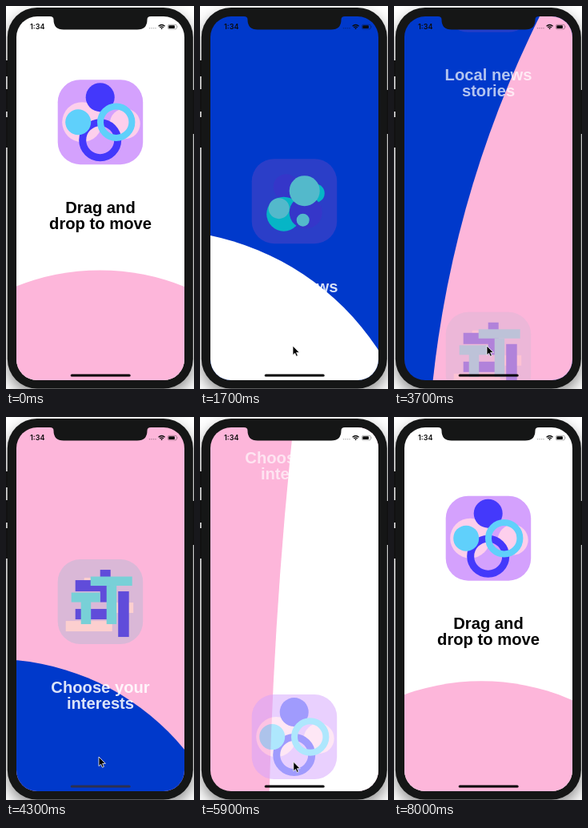
An HTML page that plays this animation: 235 px wide and 479 px high, repeating every 8100 ms.

```html
<!DOCTYPE html>
<html lang="en">
<head>
<meta charset="utf-8">
<title>Onboarding pages</title>
<style>
html, body { margin: 0; width: 100%; height: 100%; overflow: hidden; background: #fff; }
svg { display: block; width: 100vw; height: 100vh; }
.title { font: 700 20.2px "Liberation Sans", Arial, sans-serif; text-anchor: middle; }
.clock { font: 600 9px Inter, Roboto, sans-serif; }
</style>
</head>
<body>
<svg viewBox="0 0 235 479">
  <defs>
    <filter id="blur" x="-20%" y="-20%" width="140%" height="140%"><feGaussianBlur stdDeviation="9"/></filter>
    <clipPath id="screen"><rect x="13" y="13" width="210" height="455" rx="26"/></clipPath>
  </defs>
  <rect width="235" height="479" fill="#fff"/>
  <rect x="2" y="10" width="232" height="476" rx="37" opacity=".45" filter="url(#blur)"/>
  <path d="M0 68h3v20h-3zM0 104h3v28h-3zM0 139h3v38h-3zM232 105h3v55h-3z" fill="#111"/>
  <rect x="1.8" y="2" width="232" height="476.5" rx="37" fill="#151616"/>
  <g clip-path="url(#screen)">
    <rect id="base" x="12" y="12" width="212" height="457"/>
    <circle id="wave"/>
    <g id="pages"></g>
    <g fill="#0b0b0b">
      <text class="clock" x="30" y="29">1:34</text>
      <g opacity=".3">
        <circle cx="179.5" cy="27.8" r=".8"/><circle cx="182" cy="27.8" r=".8"/>
        <circle cx="184.5" cy="27.8" r=".8"/><circle cx="187" cy="27.8" r=".8"/>
      </g>
      <path d="M190.6 25.2q4-3.4 8 0M192.2 26.8q2.4-2 4.8 0" fill="none" stroke="#0b0b0b" stroke-width="1.3"/>
      <path d="M193.2 27.8q1.4-1 2.8 0l-1.4 1.5z"/>
      <rect x="202.4" y="23.3" width="11" height="5.6" rx="1.6" fill="none" stroke="#0b0b0b" stroke-opacity=".45" stroke-width=".7"/>
      <rect x="203.3" y="24.2" width="7.6" height="3.8" rx=".8"/>
      <path d="M214.2 25.1q1 1 0 2z" opacity=".5"/>
    </g>
    <rect id="home" x="80.7" y="460.5" width="75" height="3" rx="1.5"/>
  </g>
  <path d="M55 10v3q4.5 0 4.5 4q0 12.5 12.5 12.5h92q12.5 0 12.5-12.5q0-4 4.5-4v-3z" fill="#151616"/>
  <path id="cursor" d="M0 0v11.6l2.6-2.4 1.8 4 2-.9-1.8-3.9h3.7z" fill="#000" stroke="#fff" stroke-width=".8"/>
</svg>
<script>
const LOOP = 8100, STEP = 100;
const SCALE = 0.5615, RADIUS = 500, GROW = 30;
const MID = 118, WAVE_TOP = 331, PAGE_H = 456, ICON_TOP = 92.2;
const WHITE = '#fff', BLUE = '#0039cb', PINK = '#fdb6da';
const $ = id => document.getElementById(id);

const disc = (x, y, r, fill) => `<circle cx="${x}" cy="${y}" r="${r}" fill="${fill}"/>`;
const ring = (x, y, r, w, color) =>
  `<circle cx="${x}" cy="${y}" r="${r}" fill="none" stroke="${color}" stroke-width="${w}"/>`;
const bar = (x, y, w, h, fill) => `<rect x="${x}" y="${y}" width="${w}" height="${h}" fill="${fill}"/>`;

const violet = '#4338fb', sky = '#5fd0fb', blush = '#fdcfec';
const mint = '#64d2cb', teal = '#08cdc6', grape = '#4036c9';
const indigo = '#493cdb', aqua = '#64d5d7', peach = '#fcd3ce';

const pages = [
  { bg: WHITE, ink: '#000', tile: '#d4a1fd', lines: ['Drag and', 'drop to move'],
    art: disc(30.5, 53, 25, blush) + disc(84, 55, 19, blush) + disc(53, 22, 18, violet) +
         ring(53, 75.5, 22, 9, violet) + disc(25.5, 53, 16, sky) + ring(73, 53, 19.7, 8, sky) },
  { bg: BLUE, ink: '#fff', tile: '#3440c8', lines: ['Local news', 'stories'],
    art: disc(43, 35, 16, grape) + disc(79, 43, 12, teal) + disc(40, 69, 21.5, teal) +
         disc(67.5, 67, 20.5, grape) + disc(66, 40, 19, mint) + disc(34, 62, 13, mint) +
         disc(64, 76.5, 8, mint) },
  { bg: PINK, ink: '#fff', tile: '#d5b9d7', lines: ['Choose your', 'interests'],
    art: bar(33, 23, 20, 12, peach) + bar(73, 54, 21.5, 13, peach) + bar(10, 77, 58, 13, peach) +
         bar(53, 13, 13, 40.5, indigo) + bar(22, 26, 40, 14, indigo) + bar(22, 62, 50, 13, indigo) +
         bar(75.5, 40, 13.5, 57, indigo) + bar(41, 21.5, 52, 11.5, aqua) + bar(61, 33, 12.5, 48, aqua) +
         bar(17, 41.5, 36, 12, aqua) + bar(29, 53, 12.5, 28, aqua) }
];

$('pages').innerHTML = pages.map(p => `<g>
  <g transform="translate(-53.3)">
    <rect width="106.5" height="106" rx="28" fill="${p.tile}"/>${p.art}
  </g>
  ${p.lines.map((s, i) => `<text class="title" y="${166.5 + i * 20.2}" fill="${p.ink}">${s}</text>`).join('')}
</g>`).join('');
const nodes = [...$('pages').children];

// Each tap scrolls one page: [start in ms, decay per second]
const taps = [[885, 1.99], [3435, 2.05], [5516, 1.75]];

function glide(t, [start, rate]) {
  const s = Math.max(0, t - start) / 1000;
  return s ? 1 - Math.exp(-rate * s * s / (s + 0.05)) : 0;
}

const wrap = (n, m) => ((n % m) + m) % m;
const ramp = (t, a, b) => {
  const u = Math.min(1, Math.max(0, (t - a) / (b - a)));
  return u * u * (3 - 2 * u);
};

function place(el, attrs) {
  for (const key in attrs) el.setAttribute(key, attrs[key]);
}

function draw(t) {
  const scroll = taps.reduce((sum, tap) => sum + glide(t, tap), 0);
  const from = Math.ceil(scroll) - 1;
  const p = scroll - from;
  const prev = pages[wrap(from, 3)].bg, next = pages[wrap(from + 1, 3)].bg;

  // The next page grows from the left edge, then the previous one shrinks to the right.
  const growing = p < 0.5;
  const near = growing ? p : 1 - p;
  const r = SCALE * (RADIUS + 2 ** (near * GROW));
  const shift = r - (1 - near * 2) * RADIUS * SCALE;
  const [under, over] = growing ? [prev, next] : [next, prev];
  place($('base'), { fill: under });
  place($('wave'), {
    cx: growing ? MID + shift : MID - shift,
    cy: WAVE_TOP + RADIUS * SCALE, r, fill: over
  });

  nodes.forEach((node, i) => {
    const d = wrap(i - scroll + 1.5, 3) - 1.5;
    place(node, {
      transform: `translate(${MID} ${ICON_TOP + d * PAGE_H})`,
      opacity: Math.max(0, 1 - Math.abs(d) ** 1.2)
    });
  });

  place($('home'), { fill: over === BLUE ? '#2c3050' : '#000' });

  const away = 1 - ramp(t, 400, 800) + ramp(t, 5800, 6300);
  place($('cursor'), { transform: `translate(${116 + away * 8} ${425 + away * 60})` });
}

const origin = performance.now();
function tick() {
  const t = (performance.now() - origin) % LOOP;
  draw(Math.floor(t / STEP) * STEP);
  requestAnimationFrame(tick);
}
draw(0);
requestAnimationFrame(tick);
</script>
</body>
</html>
```
